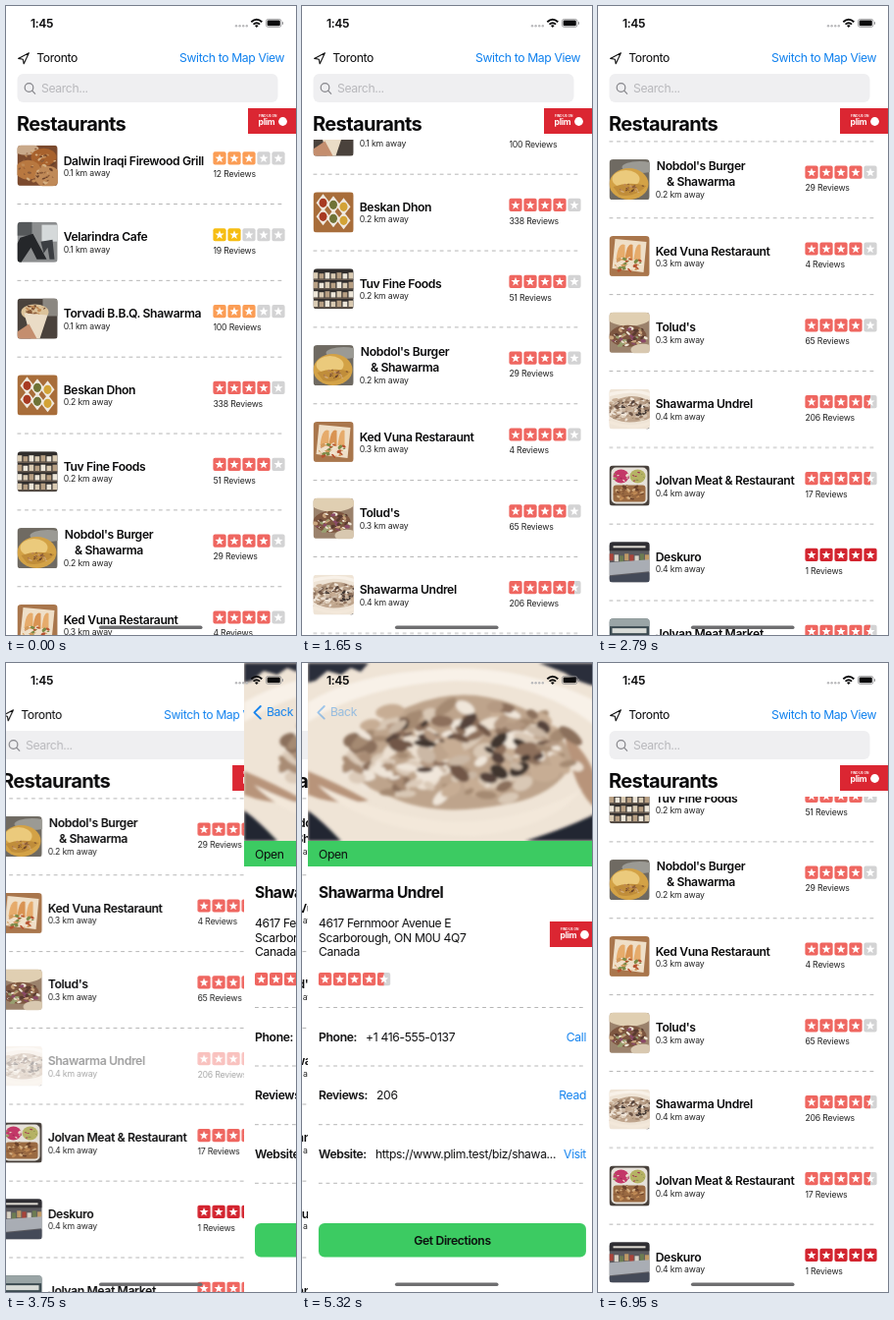
Animation, 296 px wide and 640 px high, one loop 6970 ms. Source, as an HTML page:

```html
<!DOCTYPE html>
<html lang="en">
<head>
<meta charset="utf-8">
<title>Restaurant finder</title>
<style>
  html, body { margin: 0; width: 100%; height: 100%; overflow: hidden; background: #fff; }
  svg { display: block; width: 296px; height: 640px; }
  text { font: 400 12.2px Inter, sans-serif; letter-spacing: -.03em; fill: #0b0b0c; white-space: pre; }
  .b { font-weight: 600; }
  .small { font-size: 8.7px; letter-spacing: -.02em; fill: #222; }
  .title { font-size: 20px; font-weight: 700; }
  .name { font-size: 15.5px; font-weight: 700; }
  .link { fill: #0f80ee; }
  .hint { fill: #b8b8bc; }
  .end { text-anchor: end; }
  .mid { text-anchor: middle; }
  .tiny { font-size: 3.2px; font-weight: 700; letter-spacing: 0; fill: #fff; }
  .word { font-size: 8.6px; font-weight: 700; fill: #fff; }
  .dash { stroke: #adadad; stroke-width: .9; stroke-dasharray: 3.8 3.8; }
</style>
</head>
<body>
<svg id="stage" viewBox="0 0 296 640"></svg>
<script>
const LOOP = 6970, W = 296, PITCH = 77.85, PICKED = 8;
const GREY = '#d3d3d4', YELLOW = '#f6bd12', ORANGE = '#fb9d55', CORAL = '#ef6660', RED = '#d3242f', GREEN = '#3ccb62';

const text = (x, y, s, cls = '') => `<text x="${x}" y="${y}" class="${cls}">${s}</text>`;
const rect = (x, y, w, h, fill, r = 0) => `<rect x="${x}" y="${y}" width="${w}" height="${h}" rx="${r}" fill="${fill}"/>`;
const oval = (x, y, rx, ry, fill) => `<ellipse cx="${x}" cy="${y}" rx="${rx}" ry="${ry}" fill="${fill}"/>`;
const path = (d, fill) => `<path d="${d}" fill="${fill}"/>`;
const line = (x, y) => `<path class="dash" d="M${x} ${y}h273"/>`;
const at = (x, y, body) => `<g transform="translate(${x} ${y})">${body}</g>`;
const times = (n, fn) => Array.from({ length: n }, (_, i) => fn(i)).join('');

function random(seed) {
  return () => (seed = (seed * 16807) % 2147483647) / 2147483647;
}

// Tilted speckles spread over an ellipse
function speckle(seed, n, x, y, rx, ry, size, colors) {
  const rnd = random(seed * 7919 + 11);
  rnd();
  return times(n, i => {
    const a = rnd() * 2 * Math.PI, d = Math.sqrt(rnd()), s = size * (.5 + rnd());
    const cx = (x + rx * d * Math.cos(a)).toFixed(1), cy = (y + ry * d * Math.sin(a)).toFixed(1);
    return `<g transform="rotate(${Math.round(rnd() * 90 - 45)} ${cx} ${cy})">` +
      oval(cx, cy, s.toFixed(1), (s * (.3 + rnd() * .4)).toFixed(1), colors[i % colors.length]) + '</g>';
  });
}

const starShape = Array.from({ length: 10 }, (_, i) => {
  const r = i % 2 ? 2 : 4.8, a = i * Math.PI / 5;
  return `${(6.6 + r * Math.sin(a)).toFixed(2)},${(6.9 - r * Math.cos(a)).toFixed(2)}`;
}).join(' ');

const stars = (x, y, score, color) => times(5, i => {
  const fill = Math.max(0, Math.min(1, score - i));
  return at(x + i * 15, y, rect(0, 0, 13.2, 13.2, fill === 1 ? color : GREY, 2) +
    (fill === .5 ? path('M6.6 0H2Q0 0 0 2V11.2Q0 13.2 2 13.2H6.6Z', color) : '') +
    `<polygon points="${starShape}" fill="#fff"/>`);
});

const badge = (x, y) => at(x, y, rect(0, 0, 49, 26, '#db2632') +
  text(11, 8.5, 'FIND US ON', 'tiny') + text(10.5, 17, 'plim', 'word') +
  '<circle cx="35.5" cy="13.5" r="4.4" fill="#fff"/>');

const BROWNS = ['#8a5a38', '#c08a55', '#6a412a', '#d6b184'];

const thumbs = [
  () => rect(0, 0, 41, 41, '#7b4a2e') + oval(9, 4, 13, 6, '#c9a98a') + oval(27, 12, 13, 9, '#a8622d') +
    oval(11, 25, 13, 10, '#b87840') + oval(31, 32, 13, 11, '#c08a58') + speckle(1, 60, 20, 22, 20, 19, 1.6, BROWNS),
  () => rect(0, 0, 41, 41, '#8c8e8f') + rect(25, 3, 16, 17, '#d5d9da') + rect(0, 0, 15, 14, '#55585a') +
    path('M3 16L16 12 30 38H20L14 26 4 41H0V22Z', '#25272a') + path('M24 20L36 18 38 38H33L31 26 27 32Z', '#3b3e42'),
  () => rect(0, 0, 41, 41, '#4a423c') + rect(26, 0, 15, 18, '#8b8781') + oval(18, 14, 14, 8, '#dcc39a') +
    speckle(3, 26, 18, 13, 11, 6, 2, BROWNS) + path('M7 15L31 17 23 41H14Z', '#eadcc6') + path('M0 34L12 26 20 41H0Z', '#c48e6e'),
  () => rect(0, 0, 41, 41, '#a86d3a') + times(6, i => {
    const x = 10 + i % 3 * 10.5, y = (i < 3 ? 13 : 27) + (i % 3 - 1) * 2;
    return path(`M${x} ${y - 9}L${x + 7} ${y} ${x} ${y + 9} ${x - 7} ${y}Z`, '#efe9df') +
      oval(x, y, 4, 4.6, ['#a83a22', '#d3a336', '#6f7336'][i * 2 % 3]);
  }),
  () => rect(0, 0, 41, 41, '#302d2c') + times(4, r => rect(0, 10.5 + r * 9.5, 41, 1.2, '#6f6155') +
    times(7, i => rect(i * 6, 4 + r * 9.5 + i % 2, 4.8, 6.3 - i % 2, ['#d9cab2', '#b79f83', '#ece5d8'][(i + r) % 3]))),
  () => rect(0, 0, 41, 41, '#6f6a62') + oval(31, 8, 18, 6, '#9b9a94') + oval(20, 25, 20, 16, '#d3a246') +
    oval(17, 20, 14, 9, '#ebca7c') + path('M4 28Q20 22 38 27Q26 40 10 36Z', '#c08d3a') + speckle(6, 20, 22, 29, 13, 6, 1.5, BROWNS),
  () => rect(0, 0, 41, 41, '#a9764c') + path('M6 3L38 6 35 37 3 33Z', '#efdfc8') + times(3, i =>
    path(`M${7 + i * 9} 24Q${9 + i * 9} 6 ${16 + i * 8} 9L${16 + i * 8} 25Z`, i % 2 ? '#d99352' : '#e6ab6b')) +
    speckle(7, 36, 19, 29, 16, 7, 1.8, ['#f4e9d8', '#b6522f', '#7c8a46', '#d29a5c']),
  () => rect(0, 0, 41, 41, '#9b826c') + oval(20, 5, 22, 9, '#e0cfb2') + oval(19, 24, 19, 11, '#7d5640') +
    speckle(8, 60, 20, 24, 19, 11, 2, ['#c9a47d', '#5a3a30', '#8a4a68', '#98a070', '#efe5d6']) + oval(34, 38, 12, 6, '#d8c8b0'),
  () => '<use href="#dish" transform="translate(-13) scale(.2265)"/>',
  () => rect(0, 0, 41, 41, '#48413c') + rect(2, 2, 37, 37, '#e6e1d9', 5) + oval(12, 11, 8, 7, '#c33768') +
    oval(29, 11, 8, 7, '#b5b264') + speckle(9, 18, 20, 11, 17, 6, 1.4, ['#a12a55', '#e9dccb', '#8c9150']) +
    rect(4, 20, 33, 17, '#9a6a42', 3) + speckle(10, 44, 20, 28, 15, 7, 1.9, BROWNS),
  () => rect(0, 0, 41, 41, '#5c5b60') + rect(0, 0, 41, 9, '#2f2e33') + rect(4, 4, 33, 2, '#ddd9d2') +
    times(8, i => rect(i * 5.2, 12 + i % 3, 4.2, 7, ['#a8443a', '#d8d2c6', '#6c7c52', '#c09a66'][i % 4])) +
    path('M0 21L41 18V30L0 34Z', '#a9adb4') + path('M0 35L41 31V41H0Z', '#444a58'),
  () => rect(0, 0, 41, 41, '#3b4a50') + rect(0, 0, 41, 8, '#9aa5a6') + rect(3, 10, 35, 5, '#d9dcd8') + rect(6, 17, 29, 24, '#5d4c40'),
];

const places = [
  ['Dalwin Iraqi Firewood Grill', .1, 12, 3, ORANGE],
  ['Velarindra Cafe', .1, 19, 2, YELLOW],
  ['Torvadi B.B.Q. Shawarma', .1, 100, 3, ORANGE],
  ['Beskan Dhon', .2, 338, 4, CORAL],
  ['Tuv Fine Foods', .2, 51, 4, CORAL],
  ["Nobdol's Burger|&amp; Shawarma", .2, 29, 4, CORAL],
  ['Ked Vuna Restaraunt', .3, 4, 4, CORAL],
  ["Tolud's", .3, 65, 4, CORAL],
  ['Shawarma Undrel', .4, 206, 4.5, CORAL],
  ['Jolvan Meat &amp; Restaurant', .4, 17, 4.5, CORAL],
  ['Deskuro', .4, 1, 5, RED],
  ['Jolvan Meat Market', .4, 33, 4.5, CORAL],
];

function row([name, km, reviews, score, color], i) {
  const [first, second] = name.split('|');
  const label = second
    ? text(105, -9.3, first, 'b mid') + text(105, 6.4, second, 'b mid')
    : text(58.7, -1, first, 'b');
  return at(0, 162.5 + i * PITCH,
    `<g id="row${i}">` + at(11.5, -20.7, `<g clip-path="url(#round)">${thumbs[i]()}</g>`) + label +
    text(58.7, second ? 18.2 : 10.4, km + ' km away', 'small') +
    stars(211.4, -14.2, score, color) + text(211.4, 11.7, reviews + ' Reviews', 'small') + '</g>' +
    line(11.5, 39));
}

const filling = 'M40 104Q62 58 104 44Q156 22 210 42Q262 62 270 102Q252 136 200 144Q130 158 84 136Q52 126 40 104Z';

const dish = `<g id="dish" clip-path="url(#photoBox)">${rect(0, 0, W, 181, '#efe4d6')}
  <g filter="url(#soft)">
    ${path('M0 0H62L54 9 44 5 34 12 20 8 8 18 0 20Z M236 0H296V24Q276 20 262 10Z', '#2b2d3a')}
    ${path('M0 60Q60 22 150 18Q236 18 296 66V40Q220 2 140 6Q50 10 0 40Z', '#f8f1e8')}
    ${path('M0 110Q30 122 62 140Q30 146 0 134Z M262 72Q286 90 296 122V150Q270 130 262 72Z', '#b8947a')}
    ${path(filling, '#bea48c')}
    ${speckle(5, 110, 158, 92, 122, 54, 10, ['#d9c8b5', '#a58a72', '#ece0d1', '#8b6f5b', '#c7ad94', '#f0e6da'])}
    ${speckle(12, 60, 168, 80, 88, 38, 8, ['#54423a', '#8d705b', '#715747', '#b59a83', '#3f342f', '#cbb8a5'])}
    ${speckle(17, 24, 74, 112, 44, 22, 9, ['#efe5d9', '#dccbb9', '#a98c74'])}
    ${path('M10 124Q80 158 150 162Q220 162 280 128Q250 168 170 176Q60 174 10 124Z', '#f3e8da')}
    ${path('M0 150Q14 160 34 181H0Z M222 181Q270 166 296 152V181Z', '#242733')}
  </g></g>`;

const defs = `<defs>
  <clipPath id="round"><rect width="41.4" height="41.4" rx="4"/></clipPath>
  <clipPath id="rowsBox"><rect y="136" width="296" height="504"/></clipPath>
  <clipPath id="photoBox"><rect width="296" height="181"/></clipPath>
  <filter id="soft"><feGaussianBlur stdDeviation="1.8"/></filter>
  ${dish}
</defs>`;

const list = `<g id="list">${rect(0, 0, W, 640, '#fff')}
  <g clip-path="url(#rowsBox)"><g id="rows">${places.map(row).join('')}</g></g>
  <path d="M12.6 53.4L23.4 47.8 18.2 58.8 17.3 54.2Z" fill="none" stroke="#111" stroke-width="1.1" stroke-linejoin="round"/>
  ${text(31.2, 57.4, 'Toronto')}${text(284.2, 57.4, 'Switch to Map View', 'link end')}
  ${rect(11.5, 69, 266, 29, '#efeff1', 6)}
  <path d="M26.9 86.4L30 89.6M27.8 83a4.3 4.3 0 1 1-8.6 0a4.3 4.3 0 1 1 8.6 0" fill="none" stroke="#85858a" stroke-width="1.2"/>
  ${text(36, 88, 'Search...', 'hint')}${text(11, 126.8, 'Restaurants', 'title')}${badge(247, 104)}</g>`;

const info = (y, label, value, link) =>
  `<text x="11" y="${y}"><tspan class="b">${label}:</tspan><tspan dx="9">${value}</tspan></text>` +
  text(284, y, link, 'link end') + line(11, y + 25.3);

const detail = `<g id="detail">${rect(0, 0, W, 640, '#fff')}<use href="#dish"/>
  <g id="back"><path d="M16.8 44L10.4 50.3 16.8 56.6" fill="none" stroke="#0f80ee" stroke-width="1.8" stroke-linecap="round" stroke-linejoin="round"/>
  ${text(23, 54.4, 'Back', 'link')}</g>
  ${rect(0, 181, W, 26, GREEN)}${text(11, 198.5, 'Open')}
  ${text(11, 239, 'Shawarma Undrel', 'name')}
  ${['4617 Fernmoor Avenue E', 'Scarborough, ON M0U 4Q7', 'Canada'].map((s, i) => text(11, 269 + i * 14.7, s)).join('')}
  ${badge(247, 263)}${stars(11, 315, 4.5, CORAL)}${line(11, 350.5)}
  ${info(384.7, 'Phone', '+1 416-555-0137', 'Call')}
  ${info(444.4, 'Reviews', '206', 'Read')}
  ${info(504, 'Website', 'https://www.plim.test/biz/shawa...', 'Visit')}
  ${rect(11, 570, 273, 34.5, GREEN, 6)}${text(147.5, 591.6, 'Get Directions', 'b mid')}</g>`;

const status = text(25, 22, '1:45', 'b') +
  times(4, i => `<circle cx="${235 + i * 3.6}" cy="20.3" r="1.2" fill="#b9b9bb"/>`) +
  `<g fill="none" stroke="#0b0b0c" stroke-width="1.9"><path d="M250.3 16.2Q255.8 11.4 261.3 16.2"/><path d="M252.5 18.6Q255.8 15.8 259.1 18.6"/></g>` +
  path('M253.9 20Q255.8 18.6 257.7 20L255.8 22Z', '#0b0b0c') +
  `<rect x="265.4" y="13.4" width="15.6" height="8" rx="2.2" fill="none" stroke="#8d8d90" stroke-width=".8"/>` +
  rect(266.6, 14.6, 13.2, 5.6, '#0b0b0c', 1.2) + rect(282, 16, 1, 2.8, '#8d8d90', .5) +
  rect(95, 630.4, 105.5, 3.7, '#6e6e70', 1.85);

document.getElementById('stage').innerHTML = defs + list + detail + status;

// Each step is [ms, value]; a value holds until the next step
function play(id, steps, frame) {
  const keys = steps.map(([ms, v]) => ({ offset: ms / LOOP, easing: 'step-end', ...frame(v) }));
  keys.push({ offset: 1, ...frame(steps[steps.length - 1][1]) });
  document.getElementById(id).animate(keys, { duration: LOOP, iterations: Infinity });
}

const scroll = [
  [0, 0], [830, 22], [950, 75], [1060, 118], [1180, 145], [1290, 162], [1410, 173], [1530, 181], [1650, 186], [1770, 189], [1890, 190],
  [2090, 214], [2210, 268], [2320, 311], [2440, 340], [2560, 357], [2680, 368], [2790, 375],
  [6420, 373], [6530, 366], [6640, 357], [6740, 347], [6850, 338], [6950, 331],
];
const push = [
  [0, 0], [3640, .02], [3750, .179], [3860, .58], [3970, .865], [4080, .97], [4180, .9966],
  [5320, .98], [5430, .82], [5540, .4], [5650, .12], [5760, .027], [5860, .009], [5970, .003], [6420, 0],
];
const move = (x, y) => ({ transform: `translate(${x}px, ${y}px)` });
const fade = opacity => ({ opacity });

play('rows', scroll, y => move(0, -y));
play('list', push, p => move(-.3 * W * p, 0));
play('detail', push, p => move(W * (1 - p), 0));
play('row' + PICKED, [[0, 1], [3530, .4], [4180, 1]], fade);
play('back', [[0, 1], [5320, .4], [5650, 1]], fade);
</script>
</body>
</html>
```
